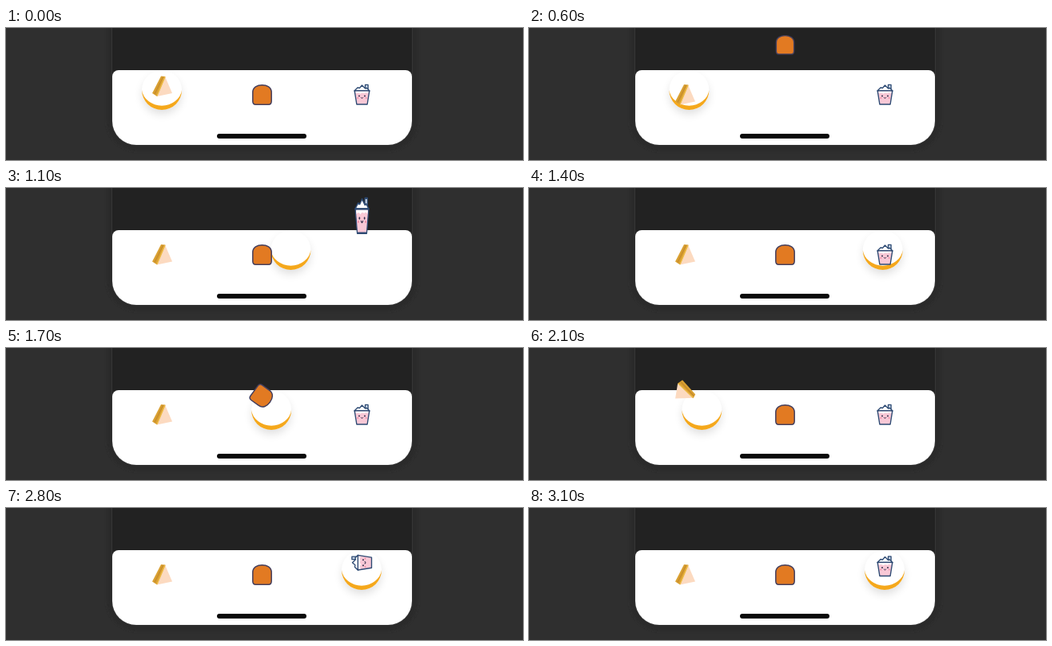
An HTML page that plays this animation: 647 px wide and 166 px high, repeating every 3.2 s.

```html
<!DOCTYPE html>
<html lang="en">
<head>
<meta charset="utf-8">
<title>Snack tab bar</title>
<style>
  html, body { margin: 0; width: 100%; height: 100%; overflow: hidden; background: #2f2f2f; }
  svg { display: block; width: 647px; height: 166px; }
</style>
</head>
<body>
<svg viewBox="0 0 647 166">
  <defs>
    <filter id="soft" x="-50%" y="-50%" width="200%" height="200%"><feGaussianBlur stdDeviation="6"/></filter>
    <filter id="edge" x="-10%" y="-10%" width="120%" height="120%"><feGaussianBlur stdDeviation="1.5"/></filter>
    <clipPath id="barClip"><path d="M133 61a8 8 0 0 1 8-8H500a8 8 0 0 1 8 8V117a30 30 0 0 1-30 30H163a30 30 0 0 1-30-30Z"/></clipPath>
  </defs>

  <rect width="647" height="166" fill="#2f2f2f"/>
  <rect x="126" y="-60" width="390" height="215" rx="38" fill="#2a2a2a" filter="url(#edge)"/>
  <path d="M132.5 0V117a30.5 30.5 0 0 0 30.5 30.5H478a30.5 30.5 0 0 0 30.5-30.5V0" fill="#222" stroke="#363636"/>
  <rect x="133" y="53" width="375" height="94" fill="#fff" clip-path="url(#barClip)"/>

  <g clip-path="url(#barClip)">
    <g id="marker">
      <circle cy="84" r="24" fill="#000" opacity=".13" filter="url(#soft)"/>
      <circle cy="78" r="25" fill="#fff"/>
      <path d="M-25 78A25 25 0 0 0 25 78A25.2 22.6 0 0 1 -25 78Z" fill="#f5a81c"/>
    </g>
  </g>
  <rect x="264" y="133" width="112" height="6" rx="3" fill="#080808"/>

  <g class="icon">
    <path d="M3.5-12.5L12.5 8.5L-6.5 12.5Z" fill="#fcdac0"/>
    <path d="M-12.5 8.5L-1.5-13L4-12.5L-6.5 12.5Z" fill="#d9a032"/>
    <path d="M-9.5 9.5L1-12" stroke="#c58a2c" stroke-width="1.3"/>
    <path d="M-6.5 12L3.5-12" stroke="#efbd4b" stroke-width="1.3"/>
  </g>

  <g class="icon">
    <path id="bun" d="M-11.7-3C-11.7-9.5-6-12.2 0-12.2S11.7-9.5 11.7-3V8Q11.7 12.2 8 12.2H-8Q-11.7 12.2-11.7 8Z" fill="#e27a22"/>
    <path d="M-11-4C-10-9-6-11.5 0-11.5S10-9 11-4Z" fill="#d2762f"/>
    <path d="M-11-3.3H11" stroke="#7fae4a" stroke-width="2"/>
    <path d="M-11 6.5H11" stroke="#f6b81f" stroke-width="2"/>
    <path d="M-11 4.6H11" stroke="#c4491f" stroke-width="1.2"/>
    <path d="M-7 1.8H-5M5 1.8H7" stroke="#e84a3c" stroke-width="1.6"/>
    <circle cx="-4.2" cy="0" r="1.1" fill="#34304d"/>
    <circle cx="4.2" cy="0" r="1.1" fill="#34304d"/>
    <path d="M-1.7 1.5Q0 3.8 1.7 1.5" fill="none" stroke="#34304d"/>
    <use href="#bun" style="fill:none"/>
    <path d="M-11.7-3C-11.7-9.5-6-12.2 0-12.2S11.7-9.5 11.7-3V8Q11.7 12.2 8 12.2H-8Q-11.7 12.2-11.7 8Z" fill="none" stroke="#45405f" stroke-width="1.5"/>
  </g>

  <g class="icon" stroke-linejoin="round">
    <path d="M4-5V-12.6H7.6V-5" fill="#c9d6e6" stroke="#2d4a73" stroke-width="1.3"/>
    <path d="M-9.5-5L-5.5-9L-3-8.5L0-12L4-8L6-8.5L9.5-5Z" fill="#fff" stroke="#2d4a73" stroke-width="1.3"/>
    <path d="M-9.3-5H9.3L6.6 12H-6.6Z" fill="#f9c8d6" stroke="#2d4a73" stroke-width="1.4"/>
    <path d="M-8-4.2H8L7.5-1.5Q5-3.8 3-1.8Q0-3.5-2-1.2Q-5-3.5-7.5-1.5Z" fill="#fff"/>
    <circle cx="-3.5" cy="1.5" r="1" fill="#34304d"/>
    <circle cx="3.5" cy="1.5" r="1" fill="#34304d"/>
    <path d="M-1.5 3.2Q0 5.8 1.5 3.2" fill="none" stroke="#34304d"/>
    <path d="M-6 4H-4.3M4.3 4H6" stroke="#f0829e" stroke-width="1.4"/>
  </g>
</svg>

<script>
const LOOP = 3200, SLIDE = 480, BASE_Y = 84;
const TABS = [195, 320, 445];
const TAPS = [
  { at: 571, tab: 1 }, { at: 1004, tab: 2 }, { at: 1400, tab: 1 },
  { at: 1846, tab: 0 }, { at: 2303, tab: 2 }
];
// Time since tap, lift, turn, width and height scale.
const DROP = [
  [0, 0, 0, 1, 1],
  [28, -63, 0, .95, .95],
  [54, -56, 0, .95, 1.05],
  [97, -48.5, 0, .9, 1.8],
  [197, -32, 70, 1, 1],
  [254, -29, 111, 1, 1],
  [300, -23, 126, 1, 1],
  [620, -10.5, 360, 1, 1],
  [697, -10, 360, 1, 1],
  [797, -10.5, 360, 1, 1]
];
const marker = document.getElementById('marker');
const icons = document.querySelectorAll('.icon');

// The CSS "ease" curve, cubic-bezier(.25, .1, .25, 1).
function ease(x) {
  if (x <= 0) return 0;
  if (x >= 1) return 1;
  const bezier = (a, b, s) => 3 * a * s * (1 - s) ** 2 + 3 * b * s * s * (1 - s) + s ** 3;
  let low = 0, high = 1;
  for (let i = 0; i < 24; i++) {
    const mid = (low + high) / 2;
    if (bezier(.25, .25, mid) < x) low = mid; else high = mid;
  }
  return bezier(.1, 1, low);
}

function dropPose(t) {
  const next = DROP.findIndex(key => key[0] > t);
  if (next < 0) return DROP[DROP.length - 1];
  const a = DROP[next - 1], b = DROP[next];
  const k = (t - a[0]) / (b[0] - a[0]);
  return a.map((v, i) => v + (b[i] - v) * k);
}

// Each slide starts wherever the previous one was interrupted.
function markerX(time) {
  let from = TABS[0];
  for (let i = 0; i < TAPS.length && TAPS[i].at <= time; i++) {
    const end = Math.min(time, TAPS[i + 1]?.at ?? LOOP);
    from += (TABS[TAPS[i].tab] - from) * ease((end - TAPS[i].at) / SLIDE);
  }
  return from;
}

function render(time) {
  const tap = TAPS.filter(t => t.at <= time).pop() ?? { at: -LOOP, tab: 0 };
  marker.setAttribute('transform', `translate(${markerX(time)} 0)`);
  icons.forEach((icon, i) => {
    const [, lift, turn, sx, sy] = i === tap.tab ? dropPose(time - tap.at) : DROP[0];
    icon.setAttribute('transform',
      `translate(${TABS[i] + .5} ${BASE_Y + lift}) rotate(${turn}) scale(${sx} ${sy})`);
  });
}

const start = performance.now();
function tick() {
  // The picture advances ten times a second.
  const time = (performance.now() - start) % LOOP;
  render(Math.floor(time / 100) * 100);
  requestAnimationFrame(tick);
}
tick();
</script>
</body>
</html>
```
